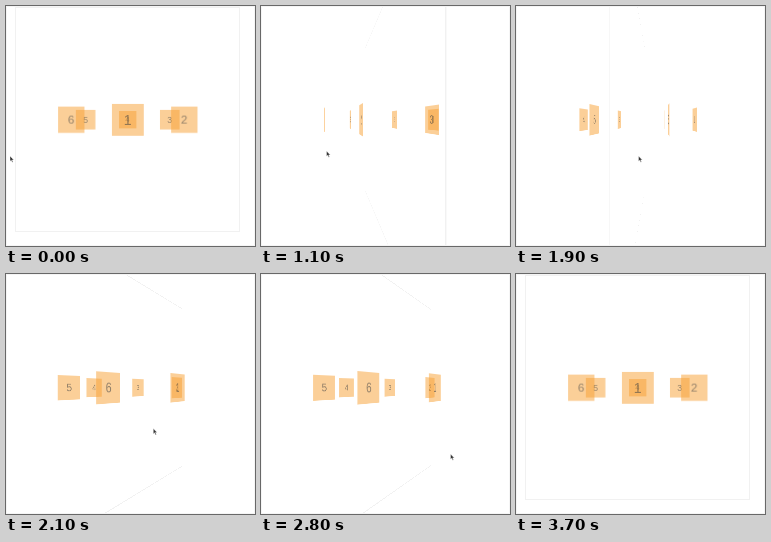
Recreate the animation shown at these times as an HTML page. Size 249 px wide and 240 px high, loop 3.8 s.

```html
<!DOCTYPE html>
<html lang="en">
<head>
<meta charset="utf-8">
<title>Panel ring</title>
<style>
  html, body { margin: 0; width: 100%; height: 100%; overflow: hidden; background: #fff; }
  #stage { position: relative; width: 249px; height: 240px; overflow: hidden; background: #fff; }
  #stage::after { content: ""; position: absolute; inset: 0; border: 1px solid #f5f5f5; }
  /* Laid out at double size so the projected text stays crisp */
  #scene {
    position: absolute; left: 0; top: 0; width: 498px; height: 480px;
    transform: scale(.5); transform-origin: 0 0;
    perspective: 380px; perspective-origin: 243px 227px;
  }
  #ring {
    position: absolute; left: 18px; top: 2px; width: 450px; height: 450px;
    box-sizing: border-box; border: 2px solid #f1f1f1; transform-style: preserve-3d;
  }
  .panel {
    position: absolute; left: 50%; top: 50%; width: 45px; height: 45px; margin: -22.5px;
    background: rgba(247, 160, 50, .5); color: rgba(70, 70, 70, .56);
    font: 20px/45px "Liberation Sans", Arial, sans-serif; text-align: center;
  }
  #cursor { position: absolute; left: 0; top: 0; width: 5px; height: 7.5px; overflow: visible; }
</style>
</head>
<body>
<div id="stage">
  <div id="scene"><div id="ring"></div></div>
  <svg id="cursor" viewBox="0 0 6 9">
    <path d="M0 0V6.4L1.5 5.1L2.6 7.6L3.7 7.1L2.6 4.7H4.6Z" fill="#333" stroke="#fff" stroke-width=".5"/>
  </svg>
</div>
<script>
  const LOOP = 3800, TICK = 100, COUNT = 6, RADIUS = 111.4, LEAVE = 3300;
  const ring = document.getElementById('ring');
  const cursor = document.getElementById('cursor');

  // Key poses: [ms, degrees] and [ms, x, y]
  const turn = [[450, 0], [700, 17], [1100, -76], [1900, -276], [2400, -346.6], [2800, -310], [3700, -360]];
  const path = [[100, 4, 150], [400, 9, 150], [700, 65.5, 145], [1300, 65.5, 145],
    [1900, 122.5, 150], [2400, 181.5, 164], [2800, 189.5, 180], [LEAVE, 228, 224]];

  for (let i = 0; i < COUNT; i++) {
    const a = i * 2 * Math.PI / COUNT;
    const panel = document.createElement('div');
    panel.className = 'panel';
    panel.textContent = i + 1;
    panel.style.transform =
      `translate3d(${RADIUS * Math.sin(a)}px, 0, ${RADIUS * Math.cos(a)}px)`;
    ring.append(panel);
  }

  // Slope at key i; at rest at the ends and beside holds
  function slope(keys, i, c) {
    const a = keys[i - 1], k = keys[i], b = keys[i + 1];
    if (!a || !b || a[c] === k[c] || b[c] === k[c]) return 0;
    return (b[c] - a[c]) / (b[0] - a[0]);
  }

  // Smooth curve through the keys of column c
  function glide(keys, t, c = 1) {
    const last = keys.length - 1;
    if (t <= keys[0][0]) return keys[0][c];
    if (t >= keys[last][0]) return keys[last][c];
    const i = keys.findIndex(k => k[0] > t);
    const a = keys[i - 1], b = keys[i], span = b[0] - a[0];
    const p = (t - a[0]) / span, q = 1 - p;
    return a[c] * q * q * (1 + 2 * p) + b[c] * p * p * (1 + 2 * q)
      + span * p * q * (slope(keys, i - 1, c) * q - slope(keys, i, c) * p);
  }

  function draw(now) {
    const t = Math.floor(now % LOOP / TICK) * TICK;
    ring.style.transform = `rotateY(${glide(turn, t)}deg)`;
    cursor.style.transform = `translate(${glide(path, t, 1)}px, ${glide(path, t, 2)}px)`;
    cursor.style.visibility = t < LEAVE ? 'visible' : 'hidden';
  }

  const start = performance.now();
  function frame() {
    draw(performance.now() - start);
    requestAnimationFrame(frame);
  }
  frame();
</script>
</body>
</html>
```
